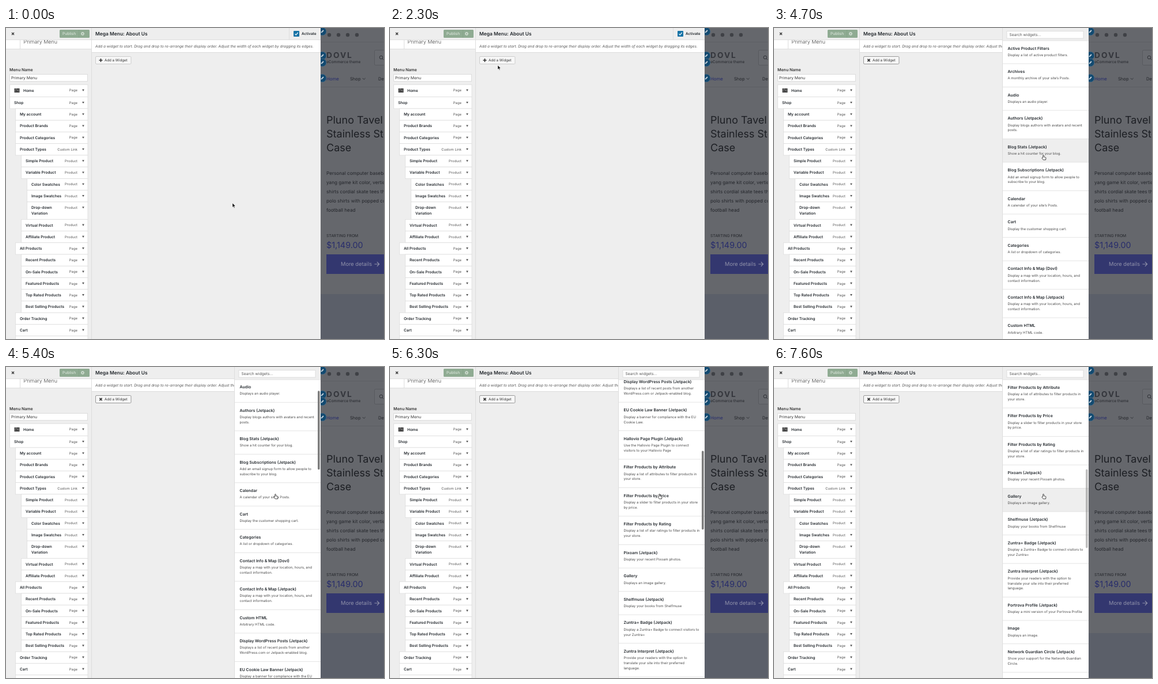
Animation, 656 px wide and 540 px high, one loop 7.7 s. Source, as an HTML page:

```html
<!DOCTYPE html>
<html lang="en">
<head>
<meta charset="utf-8">
<title>Mega menu</title>
<style>
  html, body { margin: 0; width: 100%; height: 100%; overflow: hidden; background: #eee; }
  #stage { display: block; width: 656px; height: 540px; }
  text { font-family: Inter, "Open Sans", sans-serif; text-rendering: geometricPrecision; }
</style>
</head>
<body>
<svg id="stage" viewBox="0 0 656 540"></svg>
<script>
const LOOP = 7700, STEP = 100;

// y is the middle of the capital letters
const text = (x, y, size, str, weight = 400, fill = '#333', more = '') =>
  `<text x="${x}" y="${y + size * .36}" font-size="${size}" font-weight="${weight}" fill="${fill}" ${more}>${str}</text>`;
const rect = (x, y, w, h, fill, more = '') =>
  `<rect x="${x}" y="${y}" width="${w}" height="${h}" fill="${fill}" ${more}/>`;
const line = (d, stroke, width = 1, more = '') =>
  `<path d="${d}" fill="none" stroke="${stroke}" stroke-width="${width}" ${more}/>`;
const circle = (x, y, r, fill, more = '') =>
  `<circle cx="${x}" cy="${y}" r="${r}" fill="${fill}" ${more}/>`;

// depth, label, type
const menu = [
  [0, 'Home', 'Page'], [0, 'Shop', 'Page'], [1, 'My account', 'Page'],
  [1, 'Product Brands', 'Page'], [1, 'Product Categories', 'Page'],
  [1, 'Product Types', 'Custom Link'], [2, 'Simple Product', 'Product'],
  [2, 'Variable Product', 'Product'], [3, 'Color Swatches', 'Product'],
  [3, 'Image Swatches', 'Product'], [3, 'Drop-down|Variation', 'Product'],
  [2, 'Virtual Product', 'Product'], [2, 'Affiliate Product', 'Product'],
  [1, 'All Products', 'Page'], [2, 'Recent Products', 'Page'],
  [2, 'On-Sale Products', 'Page'], [2, 'Featured Products', 'Page'],
  [2, 'Top Rated Products', 'Page'], [2, 'Best Selling Products', 'Page'],
  [1, 'Order Tracking', 'Page'], [1, 'Cart', 'Page'], [1, 'Checkout', 'Page'],
];

const widgets = [
  ['Active Product Filters', 'Display a list of active product filters.'],
  ['Archives', 'A monthly archive of your site’s Posts.'],
  ['Audio', 'Displays an audio player.'],
  ['Authors (Jetpack)', 'Display blogs authors with avatars and recent|posts.'],
  ['Blog Stats (Jetpack)', 'Show a hit counter for your blog.'],
  ['Blog Subscriptions (Jetpack)', 'Add an email signup form to allow people to|subscribe to your blog.'],
  ['Calendar', 'A calendar of your site’s Posts.'],
  ['Cart', 'Display the customer shopping cart.'],
  ['Categories', 'A list or dropdown of categories.'],
  ['Contact Info &amp; Map (Dovl)', 'Display a map with your location, hours, and|contact information.'],
  ['Contact Info &amp; Map (Jetpack)', 'Display a map with your location, hours, and|contact information.'],
  ['Custom HTML', 'Arbitrary HTML code.'],
  ['Display WordPress Posts (Jetpack)', 'Displays a list of recent posts from another|WordPress.com or Jetpack-enabled blog.'],
  ['EU Cookie Law Banner (Jetpack)', 'Display a banner for compliance with the EU|Cookie Law.'],
  ['Hallovio Page Plugin (Jetpack)', 'Use the Hallovio Page Plugin to connect|visitors to your Hallovio Page'],
  ['Filter Products by Attribute', 'Display a list of attributes to filter products in|your store.'],
  ['Filter Products by Price', 'Display a slider to filter products in your store|by price.'],
  ['Filter Products by Rating', 'Display a list of star ratings to filter products in|your store.'],
  ['Pixoam (Jetpack)', 'Display your recent Pixoam photos.'],
  ['Gallery', 'Displays an image gallery.'],
  ['Shelfmuse (Jetpack)', 'Display your books from Shelfmuse'],
  ['Zuntra+ Badge (Jetpack)', 'Display a Zuntra+ Badge to connect visitors to|your Zuntra+'],
  ['Zuntra Interpret (Jetpack)', 'Provide your readers with the option to|translate your site into their preferred|language.'],
  ['Portrova Profile (Jetpack)', 'Display a mini version of your Portrova Profile'],
  ['Image', 'Displays an image.'],
  ['Network Guardian Circle (Jetpack)', 'Show your support for the Network Guardian|Circle.'],
  ['Links', 'Your blogroll.'],
];

function sidebar() {
  let out = rect(0, 0, 149, 540, '#eee') + rect(0, 20, 148, 16, '#fff') +
    line('M24.5 20V36M0 36.5H148', '#ddd') + text(30.5, 23.5, 9, 'Primary Menu', 300, '#444') +
    rect(0, 0, 148, 20, '#eee') + line('M0 20.5H148', '#ddd') +
    line('M10 8l4 4m0-4l-4 4', '#333', 1.3) +
    rect(93, 3, 52, 14, '#8fab92', 'rx="1.5"') + line('M126.5 3V17', '#82a086', .7) +
    text(98, 10, 6.6, 'Publish', 500, '#dbe6dc') +
    circle(133, 10, 1.8, 'none', 'stroke="#dbe6dc" stroke-width="1.2"') +
    circle(133, 10, 2.8, 'none', 'stroke="#dbe6dc" stroke-width=".9" stroke-dasharray="1.1 1.1"') +
    text(6, 72, 7, 'Menu Name', 600) +
    rect(6.5, 80.5, 135, 12, '#fff', 'stroke="#ddd"') + text(9, 86.3, 6.8, 'Primary Menu');
  let y = 98;
  menu.forEach(([depth, label, type], i) => {
    const x = 6 + depth * 10, lines = label.split('|');
    const h = (i ? 20.25 : 21.4) + (lines.length - 1) * 10.1, mid = y + 10.2;
    out += rect(x + .5, y + .3, 141.5 - x, h, '#fff', 'stroke="#ddd" stroke-width=".8"');
    lines.forEach((s, k) => out += text(x + (i ? 8 : 24), mid + k * 10.1, 6.55, s, 600, '#23282d'));
    out += text(124, mid, 5.95, type, 400, '#555', 'text-anchor="end"') +
      `<path d="M132.1 ${mid - 1.6}h3.8l-1.9 3.3z" fill="#555"/>`;
    y += h;
  });
  return out + rect(14.5, 105, 9, 7, '#333') +
    line('M14.5 107.5h9M14.5 110h4m1 0h4M17.5 105v2m3 0v2', '#bbb', .6) +
    line('M148.5 0V540', '#ddd');
}

const workspace = () => rect(149, 0, 397, 540, '#eee') + rect(149, 21, 397, 21, '#fff') +
  line('M149 20.5H546M149 42.5H546M491.5 0V20', '#ddd') +
  text(155, 10, 8.45, 'Mega Menu: About Us', 600, '#23282d') +
  rect(499, 5, 10, 10, '#1673a6', 'rx="1"') + line('M501.5 10.2l1.8 1.9 3.4-4.2', '#fff', 1.2) +
  text(513, 10, 6.4, 'Activate', 600, '#23282d') +
  text(155, 32, 6.4, 'Add a widget to start. Drag and drop to re-arrange their display order. Adjust the width of each widget by dragging its edges.', 400, '#555', 'font-style="italic"') +
  rect(155.5, 49.5, 61.5, 13, '#f7f7f7', 'id="button" rx="1.5" stroke="#ccc"') +
  `<g id="sign" transform="translate(164.5 56)">${line('M-3 0H3M0-3V3', '#333', 1.6)}</g>` +
  text(171, 56, 6.2, 'Add a Widget', 400, '#333');

function panel() {
  let y = 21.4, list = '';
  for (const item of widgets) {
    const lines = item[1].split('|');
    item.top = y;
    item.height = 40.55 + (lines.length - 1) * 8.92;
    list += line(`M397 ${y + item.height}H546`, '#ddd', .8) + text(405.5, y + 13.7, 6.98, item[0], 600, '#23282d');
    lines.forEach((s, k) => list += text(405.5, y + 25.3 + k * 8.92, 6, s, 400, '#4a4a4a'));
    y += item.height;
  }
  return `<g id="panel">${rect(396, 0, 150, 540, '#fff')}
    <g id="list">${rect(397, 0, 149, 0, '#eee', 'id="hover"')}${list}</g>
    ${rect(396, 0, 150, 22, '#eee')}${line('M396 22H546', '#ddd', .8)}
    ${rect(404, 5.5, 133, 12.5, '#fff', 'stroke="#ddd"')}${text(408.5, 12, 6.7, 'Search widgets…', 400, '#555')}
    ${line('M396.5 0V540', '#ddd')}${rect(541, 0, 3.6, 137, '#7d7d7d', 'id="thumb" rx="1.8"')}</g>`;
}

function shopPage() {
  const ink = '#24262b', blue = '#272c6c', pale = '#9092aa';
  const copy = ['Personal computer baseball', 'yang game kit color, vertical', 'shirts cordial skate tees the',
    'polo shirts with popped collars', 'football head'];
  return `<svg x="546" y="0" width="110" height="540" viewBox="546 0 110 540">` +
    rect(546, 0, 110, 540, '#65676c') + rect(546, 462, 110, 78, '#5b5f69') +
    line('M546 24.5H656M546 102.5H656', '#5d5f64') +
    [561, 577, 593, 609].map(x => circle(x, 12, 3.2, '#3f4146')).join('') +
    text(556, 47.3, 13.7, 'DOVL', 700, '#34363c', 'letter-spacing="2"') +
    text(556, 58.5, 6.6, 'eCommerce theme', 400, ink) +
    rect(639.5, 38.5, 30, 26, '#686a6f', 'rx="2" stroke="#57595e"') +
    circle(651, 51, 2.8, 'none', `stroke="${ink}" stroke-width=".8"`) + line('M653 53l2.2 2.2', ink, .8) +
    text(556, 88, 7.8, 'Home', 400, blue) + text(597, 88, 7.6, 'Shop', 400, ink) +
    line('M618.8 87l2.4 2.4 2.4-2.4', ink, .8) + text(646, 88, 7.6, 'Demos', 400, ink) +
    ['Pluno Tavel', 'Stainless Steel', 'Case'].map((s, i) => text(556, 160 + i * 23.8, 18, s, 400, '#1d1f24')).join('') +
    copy.map((s, i) => text(556, 252.5 + i * 15.8, 8.2, s, 400, ink)).join('') +
    text(556, 360.5, 6.8, 'STARTING FROM', 400, ink) + text(556, 377.3, 14.4, '$1,149.00', 400, blue) +
    rect(556, 393, 100, 34, '#33376f') + text(581, 410, 9.3, 'More details', 400, pale) +
    line('M639.5 410h8m-3.6-3.8l3.8 3.8-3.8 3.8', pale, 1.1) +
    [6, 48, 60, 87].map(y => circle(549, y, 7, '#124a70', 'stroke="#5f7387" stroke-width=".7"') +
      line(`M547 ${y + 2}l4-4`, '#c5ced6', 1.8)).join('') + '</svg>';
}

const cursors = `<g id="cursor">
  <path id="arrow" transform="scale(.9)" d="M0 0V8.2L1.9 6.4 3.2 9.4 4.5 8.8 3.2 5.9H5.8Z" fill="#000" stroke="#fff" stroke-width=".6"/>
  <path id="hand" transform="translate(.6 .3) scale(.85)" d="M-1.1 5.2V.8a1 1 0 0 1 2 0V3.6l2.8.6c1 .2 1.5.8 1.4 1.8l-.5 3.6H-.3L-3 6.4c-.5-.9.6-1.6 1.3-1z" fill="#fff" stroke="#111" stroke-width=".9"/></g>`;

const stage = document.getElementById('stage');
stage.innerHTML = sidebar() + workspace() + panel() + shopPage() + cursors;
const part = id => document.getElementById(id);
const set = (id, attrs) => { for (const k in attrs) part(id).setAttribute(k, attrs[k]); };

// keys: [time, value, value...], joined by straight segments
function at(keys, t) {
  const i = keys.findIndex(k => k[0] > t);
  if (i < 0) return keys[keys.length - 1].slice(1);
  if (!i) return keys[0].slice(1);
  const a = keys[i - 1], b = keys[i], p = (t - a[0]) / (b[0] - a[0]);
  return a.slice(1).map((v, k) => v + (b[k + 1] - v) * p);
}

const pointer = [[0, 393, 304], [400, 379, 296], [1000, 379, 296], [1100, 375, 293], [1500, 292, 208],
  [1900, 217, 108], [2200, 189, 68], [2500, 183, 58], [3000, 183, 58], [3300, 235, 92],
  [3600, 345, 150], [3900, 440, 200], [4000, 440, 200], [4300, 460, 216], [4600, 467, 220.5]];
const slide = [[2600, 150], [2700, 140], [2800, 50], [2900, 10.8], [3000, 0]];
const scrolling = [[5000, 0], [5100, 4], [5300, 45], [5600, 155], [5900, 301.5], [6200, 482],
  [6400, 582], [6600, 646], [6700, 661], [6900, 668], [7200, 670.5]];
const thumbFade = [[5000, 0], [5100, 1], [7400, 1], [7700, .25]];

function draw(t) {
  const [x, y] = at(pointer, t), [shift] = at(slide, t), [scroll] = at(scrolling, t);
  const open = t >= 2700, moving = t >= 5100 && t < 7400;
  const onButton = x > 155 && x < 217 && y > 49 && y < 63;
  const onPanel = open && x > 396 + shift;
  const item = onPanel && !moving && widgets.find(w => y + scroll >= w.top && y + scroll < w.top + w.height);

  set('button', { stroke: open || onButton ? '#999' : '#ccc', fill: onButton ? '#fafafa' : '#f7f7f7' });
  set('sign', { transform: `translate(164.5 56) rotate(${open ? 45 : 0})` });
  set('panel', { transform: `translate(${shift} 0)`, visibility: open ? 'visible' : 'hidden' });
  set('list', { transform: `translate(0 ${-scroll})` });
  set('hover', { y: item ? item.top : 0, height: item ? item.height : 0 });
  set('thumb', { y: 22.5 + scroll * .231, opacity: at(thumbFade, t)[0] });
  set('cursor', { transform: `translate(${x} ${y})` });
  set('arrow', { opacity: onButton || onPanel ? 0 : 1 });
  set('hand', { opacity: onButton || onPanel ? 1 : 0 });
}

const start = performance.now();
function tick() {
  const t = (performance.now() - start) % LOOP;
  draw(Math.floor(t / STEP) * STEP);
  requestAnimationFrame(tick);
}
tick();
</script>
</body>
</html>
```
